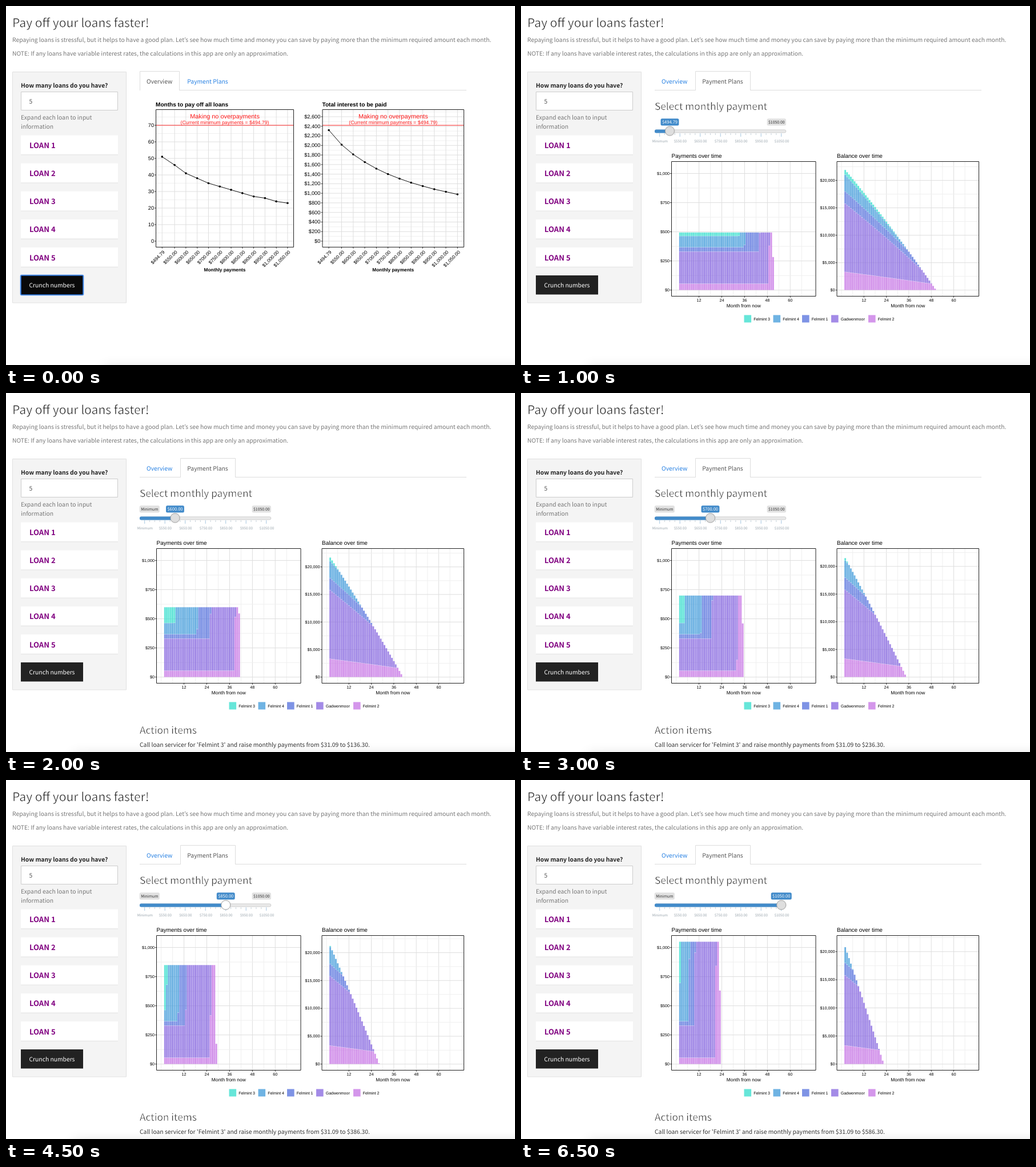
An HTML page with a canvas for the animation above (7000 ms loop, 891 px wide and 629 px high).

```html
<!DOCTYPE html>
<html lang="en">
<head>
<meta charset="utf-8">
<title>Loan payoff planner</title>
<style>
html, body { margin: 0; width: 100%; height: 100%; overflow: hidden; background: #fff; }
canvas { display: block; }
</style>
</head>
<body>
<canvas id="stage" width="891" height="629"></canvas>
<script>
const ctx = document.getElementById('stage').getContext('2d');
const UI = '"Noto Sans CJK KR", "Noto Sans CJK JP", "Noto Sans CJK SC", "Open Sans", sans-serif';
const PLOT = '"Liberation Sans", Arial, sans-serif';
const LOOP = 7000, STEP = 500, BODY = 10.32;
const MINIMUM = 494.79;
const PAYMENTS = [MINIMUM, ...Array.from({ length: 11 }, (_, i) => 550 + 50 * i)];
const MONTHS = [51, 46, 41, 38, 35, 33, 31, 29, 27, 26, 24, 23];
const INTEREST = [2320, 2015, 1813, 1652, 1515, 1401, 1306, 1222, 1151, 1085, 1032, 978];

// In order of payoff priority
const LOANS = [
  { name: 'Felmint 3', balance: 932, rate: 0.068, pay: 31.09, color: '#40e0d0', keyX: 390.5 },
  { name: 'Felmint 4', balance: 3235, rate: 0.06, pay: 96.5, color: '#4ca1dd', keyX: 441.5 },
  { name: 'Felmint 1', balance: 2265, rate: 0.042, pay: 36.8, color: '#5e78df', keyX: 492 },
  { name: 'Gadwenmoor', balance: 12905, rate: 0.044, pay: 275.8, color: '#8c6fe2', keyX: 543 },
  { name: 'Felmint 2', balance: 3400, rate: 0.04, pay: 54.6, color: '#ca7ce7', keyX: 608 }
];

function simulate(budget) {
  const left = LOANS.map(l => l.balance);
  const months = [];
  while (left.some(b => b > 0.01) && months.length < 72) {
    const paid = LOANS.map((l, i) => {
      left[i] *= 1 + l.rate / 12;
      const p = Math.min(l.pay, left[i]);
      left[i] -= p;
      return p;
    });
    let extra = budget - paid.reduce((a, b) => a + b, 0);
    for (let i = 0; i < left.length && extra > 0; i++) {
      const p = Math.min(extra, left[i]);
      paid[i] += p;
      left[i] -= p;
      extra -= p;
    }
    months.push({ paid, left: left.slice() });
  }
  return months;
}
const plans = [0, ...PAYMENTS].map(simulate);

const money = (v, digits = 2) => '$' + v.toLocaleString('en-US',
  { minimumFractionDigits: digits, maximumFractionDigits: digits });
const plain = v => '$' + v.toFixed(2);

function text(str, x, y, size, color, { font = UI, weight = 400, align = 'left', base = 'alphabetic' } = {}) {
  ctx.font = `${weight} ${size}px ${font}`;
  ctx.fillStyle = color;
  ctx.textAlign = align;
  ctx.textBaseline = base;
  ctx.fillText(str, x, y);
}
const plotText = (str, x, y, size, opts = {}, color = '#000') =>
  text(str, x, y, size, color, { font: PLOT, ...opts });

function box(x, y, w, h, fill, stroke, radius = 0) {
  ctx.beginPath();
  ctx.roundRect(x, y, w, h, radius);
  if (fill) { ctx.fillStyle = fill; ctx.fill(); }
  if (stroke) { ctx.strokeStyle = stroke; ctx.lineWidth = 1; ctx.stroke(); }
}
function line(x1, y1, x2, y2, color, width = 1) {
  ctx.beginPath();
  ctx.moveTo(x1, y1);
  ctx.lineTo(x2, y2);
  ctx.strokeStyle = color;
  ctx.lineWidth = width;
  ctx.stroke();
}

// A white outline thins the strokes to a light weight
function heading(str, x, y, size) {
  text(str, x, y, size, '#222');
  ctx.strokeStyle = '#fff';
  ctx.lineWidth = 0.55;
  ctx.lineJoin = 'round';
  ctx.strokeText(str, x, y);
}

function page(overview) {
  ctx.fillStyle = '#fff';
  ctx.fillRect(0, 0, 891, 629);
  heading('Pay off your loans faster!', 11, 37, 21.05);
  text('Repaying loans is stressful, but it helps to have a good plan. Let’s see how much time and money ' +
    'you can save by paying more than the minimum required amount each month.', 11, 63, BODY, '#777');
  text('NOTE: If any loans have variable interest rates, the calculations in this app are only an approximation.',
    11, 87, BODY, '#777');

  box(11.5, 115.5, 199, 404.5, '#f4f4f4', '#e0e0e0');
  text('How many loans do you have?', 26, 142.5, BODY, '#222', { weight: 700 });
  box(26.5, 150.5, 169, 32, '#fff', '#ccc');
  text('5', 40.5, 171, BODY, '#555');
  text('Expand each loan to input', 26, 199, BODY, '#777');
  text('information', 26, 215.3, BODY, '#777');
  for (let i = 0; i < 5; i++) {
    const y = 226.5 + 49.15 * i;
    box(26, y + 0.8, 170, 34, '#e6e6e6');
    box(26, y, 170, 33.6, '#fff');
    text('LOAN ' + (i + 1), 41, y + 22.5, 13, '#800080', { weight: 700 });
  }
  if (overview) {
    box(24.5, 470.5, 112, 37, '#8db8f3', null, 3);
    box(25.2, 471.2, 110.6, 35.6, '#2f78dc', null, 2);
    box(26.8, 472.8, 107.4, 32.4, '#090909');
  } else {
    box(26, 472, 109, 33.6, '#222');
  }
  text('Crunch numbers', 40.5, 493, BODY, '#fff');

  line(234, 147.5, 806, 147.5, '#ddd');
  const [x, w] = overview ? [234.5, 69] : [305.5, 96];
  box(x, 114.5, w, 33, '#fff', '#ddd');
  line(x + 0.5, 147.5, x + w - 0.5, 147.5, '#fff', 2);
  text('Overview', 246, 135.5, BODY, overview ? '#555' : '#2780e3');
  text('Payment Plans', 317.3, 135.5, BODY, overview ? '#2780e3' : '#555');

  ctx.save();
  ctx.shadowColor = 'rgba(0,0,0,.16)';
  ctx.shadowBlur = 22;
  ctx.fillStyle = '#fff';
  ctx.fillRect(overview ? 172 : 118, 634, 900, 40);
  ctx.restore();
}

function overviewChart({ title, left, right, unit, count, minorCount, tick, values, xFirst, xStep, labelX }) {
  const top = 181.5, bottom = 422.5, zero = 412, mid = (left + right) / 2;
  const px = p => xFirst + (p - 550) / 50 * xStep;
  for (let i = 0; i < minorCount; i++) {
    const y = zero - (i + 0.5) * unit;
    line(left, y, right, y, '#f0f0f0');
  }
  for (let i = 0; i <= count; i++) {
    const y = zero - i * unit;
    line(left, y, right, y, '#dedede');
    line(left - 2.5, y, left, y, '#333');
    plotText(tick(i), labelX, y + 0.4, 9.2, { align: 'right', base: 'middle' });
  }
  for (const p of PAYMENTS) {
    const x = px(p);
    line(x, top, x, bottom, '#dedede');
    line(x, bottom, x, bottom + 2.5, '#333');
    ctx.save();
    ctx.translate(x + 3.5, 430);
    ctx.rotate(-Math.PI / 4);
    plotText(money(p), 0, 0, 8.4, { align: 'right', base: 'middle' });
    ctx.restore();
  }
  line(left, 209, right, 209, '#ff2a2a', 1.2);
  plotText('Making no overpayments', mid, 196.5, 10.9, { align: 'center' }, '#ff1a1a');
  plotText(`(Current minimum payments = ${plain(MINIMUM)})`, mid, 206.9, 8.76, { align: 'center' }, '#ff1a1a');

  const points = values.map((v, i) => [px(PAYMENTS[i]), zero - v * unit]);
  ctx.beginPath();
  points.forEach(([x, y]) => ctx.lineTo(x, y));
  ctx.strokeStyle = '#111';
  ctx.lineWidth = 1;
  ctx.stroke();
  ctx.fillStyle = '#000';
  for (const [x, y] of points) {
    ctx.beginPath();
    ctx.arc(x, y, 1.8, 0, 7);
    ctx.fill();
  }
  box(left, top, right - left, bottom - top, null, '#222');
  plotText(title, left - 0.5, 175.5, 10.08, { weight: 700 });
  plotText('Monthly payments', mid, 464.8, 8.3, { weight: 700, align: 'center' });
}

function overviewTab() {
  overviewChart({
    title: 'Months to pay off all loans', left: 262.5, right: 503.5, unit: 29, count: 7, minorCount: 8,
    tick: i => String(i * 10), values: MONTHS.map(m => m / 10), xFirst: 295.1, xStep: 19.78, labelX: 259
  });
  overviewChart({
    title: 'Total interest to be paid', left: 554, right: 801.5, unit: 16.77, count: 13, minorCount: 14,
    tick: i => money(i * 200, 0), values: INTEREST.map(v => v / 200), xFirst: 587.5, xStep: 20.28, labelX: 550.3
  });
}

function tag(str, center, size, fill, color) {
  ctx.font = `400 ${size}px ${UI}`;
  const w = ctx.measureText(str).width + 4.8;
  box(center - w / 2, 197.3, w, 12.2, fill, null, 2.5);
  text(str, center, 206.4, size, color, { align: 'center' });
}

function slider(index) {
  const at = i => 242.7 + 17.75 * i;
  const x = at(index);
  box(234.4, 216.9, 229.4, 5, '#e9e9e9', '#cfcfcf', 2.5);
  box(234, 216.4, x - 234, 6, '#428bca', null, 2.5);
  for (let i = 0; i <= 24; i++) {
    const tx = at(i / 2), major = i % 4 === 0;
    line(tx, 223, tx, major ? 229 : 226, major ? '#8fb8d8' : '#b5c4cf', 0.8);
    if (major) text(i ? plain(PAYMENTS[i / 2 - 1]) : 'Minimum', tx + 0.6, 239, 6.16, '#99a4ac', { align: 'center' });
  }
  if (index > 1) tag('Minimum', 251.3, 6.85, '#e1e1e1', '#333');
  if (index < 10) tag('$1050.00', 447.3, 6.85, '#e1e1e1', '#333');
  tag(index ? plain(PAYMENTS[index - 1]) : 'Minimum', x, 7.5, '#428bca', '#fff');
  ctx.save();
  ctx.shadowColor = 'rgba(0,0,0,.3)';
  ctx.shadowBlur = 2;
  box(x - 8, 211, 16, 16, index === 0 || index === 8 ? '#fff' : '#dedede', null, 8);
  ctx.restore();
  box(x - 8, 211, 16, 16, null, '#aaa', 8);
}

function barChart({ title, left, right, max, major, count, months, key }) {
  const top = 272.5, bottom = 508.5, height = bottom - top;
  const zero = bottom - height * 0.05 / 1.1;
  const perMonth = (right - left) / 75.9, perUnit = height / 1.1 / max;
  const px = m => left + (m + 2.45) * perMonth;
  const py = v => zero - v * perUnit;
  for (let m = 0; m <= 66; m += 6) {
    const isMajor = m > 0 && m % 12 === 0;
    line(px(m), top, px(m), bottom, isMajor ? '#dedede' : '#efefef');
    if (!isMajor) continue;
    line(px(m), bottom, px(m), bottom + 2.5, '#333');
    plotText(m, px(m), 515.8, 7.2, { align: 'center', base: 'middle' });
  }
  for (let i = 0; i <= count; i++) {
    const y = py(i * major), minor = py((i + 0.5) * major);
    line(left, y, right, y, '#dedede');
    if (minor > top) line(left, minor, right, minor, '#efefef');
    line(left - 2.5, y, left, y, '#333');
    plotText(money(i * major, 0), left - 3.5, y + 0.3, 7.2, { align: 'right', base: 'middle' });
  }
  // The axis limits cut off the first and the seventieth month
  ctx.globalAlpha = 0.8;
  for (let m = 2; m <= Math.min(months.length, 69); m++) {
    let sum = 0;
    for (let i = LOANS.length - 1; i >= 0; i--) {
      const v = months[m - 1][key][i], h = v * perUnit;
      sum += v;
      if (h < 0.05) continue;
      ctx.fillStyle = LOANS[i].color;
      ctx.fillRect(px(m - 0.45), py(sum) + 0.15, perMonth * 0.9, Math.max(h - 0.3, 0.1));
    }
  }
  ctx.globalAlpha = 1;
  box(left, top, right - left, height, null, '#222');
  plotText(title, left, 266.2, 9.98);
  plotText('Month from now', (left + right) / 2, 527.8, 8.35, { align: 'center' });
}

function plansTab(index) {
  const months = plans[index];
  heading('Select monthly payment', 234, 182, 17.3);
  slider(index);
  barChart({ title: 'Payments over time', left: 263.5, right: 516, max: 1050, major: 250, count: 4, months, key: 'paid' });
  barChart({
    title: 'Balance over time', left: 553, right: 801.5, max: months[0].left.reduce((a, b) => a + b),
    major: 5000, count: 4, months, key: 'left'
  });
  for (const loan of LOANS) {
    ctx.globalAlpha = 0.8;
    box(loan.keyX, 541.5, 12.6, 13, loan.color);
    ctx.globalAlpha = 1;
    plotText(loan.name, loan.keyX + 16.7, 550.6, 7);
  }
  if (index < 2) return;
  heading('Action items', 234, 597, 17.3);
  const raised = LOANS[0].pay + PAYMENTS[index - 1] - MINIMUM;
  text(`Call loan servicer for '${LOANS[0].name}' and raise monthly payments from ` +
    `${plain(LOANS[0].pay)} to ${plain(raised)}.`, 234, 619.6, BODY, '#333');
}

function draw() {
  const step = Math.floor(performance.now() % LOOP / STEP);
  ctx.textRendering = 'geometricPrecision';
  page(step === 0);
  if (step === 0) overviewTab();
  else plansTab(step - 1);
  requestAnimationFrame(draw);
}
draw();
</script>
</body>
</html>
```
